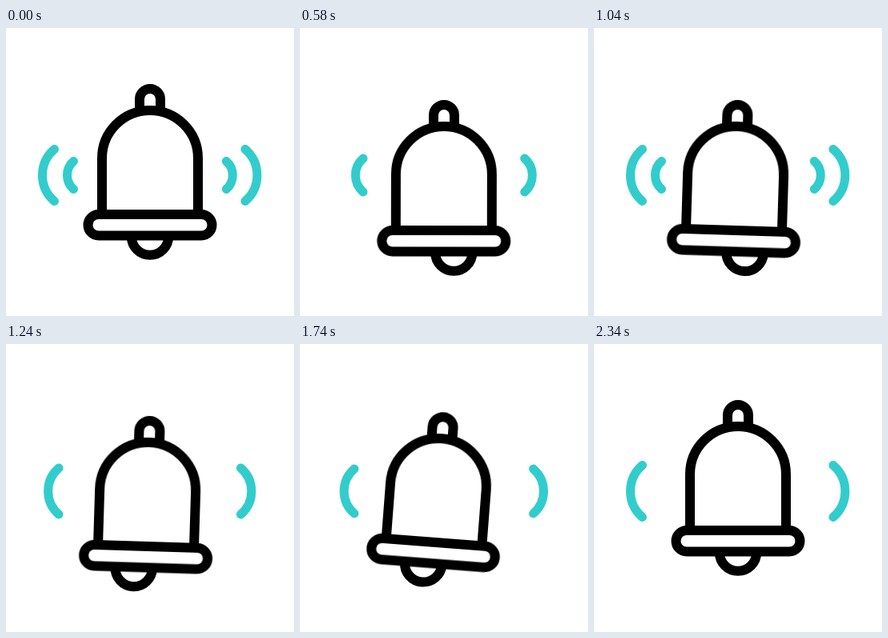
Write an HTML page without scripts that moves like this. It is 360 px wide and 360 px high and loops after 2.4 s.

```html
<!DOCTYPE html>
<html lang="en">
<head>
<meta charset="utf-8">
<title>Ringing bell</title>
<style>
  :root {
    --loop: 2400ms;
    --near: path("M84.5 166.5A23.1 23.1 0 0 0 84.5 201.5M275.3 166.5A23.1 23.1 0 0 1 275.3 201.5");
    --far: path("M60.5 151.5A42.7 42.7 0 0 0 60.5 216.5M298.9 151.5A42.7 42.7 0 0 1 298.9 216.5");
    --swing: cubic-bezier(.37, 0, .63, 1);
  }
  html, body { margin: 0; width: 100%; height: 100%; overflow: hidden; background: #fff; }
  svg { display: block; width: 100%; height: 100%; }

  .waves { fill: none; stroke: #33cccc; stroke-width: 11; stroke-linecap: round; }
  .wave { animation: spread var(--loop) calc(var(--k) * 260ms - var(--loop)) infinite; }
  .rest { d: var(--far); animation: rest var(--loop) step-end infinite; }

  .bell { fill: #fff; stroke: #000; stroke-width: 12; transform-origin: 180px 70px;
    animation: drop var(--loop) var(--swing) infinite, ring var(--loop) var(--swing) infinite; }
  .clapper { animation: clap var(--loop) var(--swing) infinite; }

  /* Each wave grows in 13 steps, then lingers for one more */
  @keyframes spread {
    0% { d: var(--near); opacity: 1; animation-timing-function: steps(13); }
    10.8333% { d: var(--far); opacity: 1; animation-timing-function: step-end; }
    11.666%, 100% { d: var(--far); opacity: 0; }
  }
  @keyframes rest {
    0% { opacity: 1; }
    .833% { opacity: 0; }
    98.333%, 100% { opacity: 1; }
  }
  @keyframes drop {
    0%, 86.7%, 100% { translate: 0 0; }
    10%, 65.8% { translate: 0 20px; }
  }
  @keyframes ring {
    0%, 88.3%, 100% { rotate: 0deg; }
    12.5%, 28.33%, 47.1% { rotate: 4.5deg; }
    20%, 37.1% { rotate: -4.5deg; }
    59.2% { rotate: -4.2deg; }
    70.8% { rotate: 4.5deg; }
  }
  @keyframes clap {
    0%, 88.3%, 100% { translate: 0 0; }
    7.9%, 24.17% { translate: 12.5px 0; }
    17.9% { translate: -12.5px 0; }
    32.5%, 52% { translate: -14.5px 0; }
    43.33%, 65.4% { translate: 14.5px 0; }
    74.7% { translate: -15px 0; }
  }
</style>
</head>
<body>
<svg viewBox="0 0 360 360">
  <g class="waves">
    <path class="rest"/>
    <path class="wave" style="--k:0"/>
    <path class="wave" style="--k:1"/>
    <path class="wave" style="--k:2"/>
    <path class="wave" style="--k:3"/>
    <path class="wave" style="--k:4"/>
    <path class="wave" style="--k:5"/>
    <path class="wave" style="--k:6"/>
    <path class="wave" style="--k:7"/>
    <path class="wave" style="--k:8"/>
  </g>
  <g class="bell">
    <circle class="clapper" cx="180" cy="260.5" r="23.2"/>
    <path d="M167 103V89a13 13 0 0 1 26 0v14"/>
    <path d="M120 233V163a60 60 0 0 1 120 0v70"/>
    <rect x="102.5" y="233" width="155" height="26.5" rx="13.25"/>
  </g>
</svg>
</body>
</html>
```
